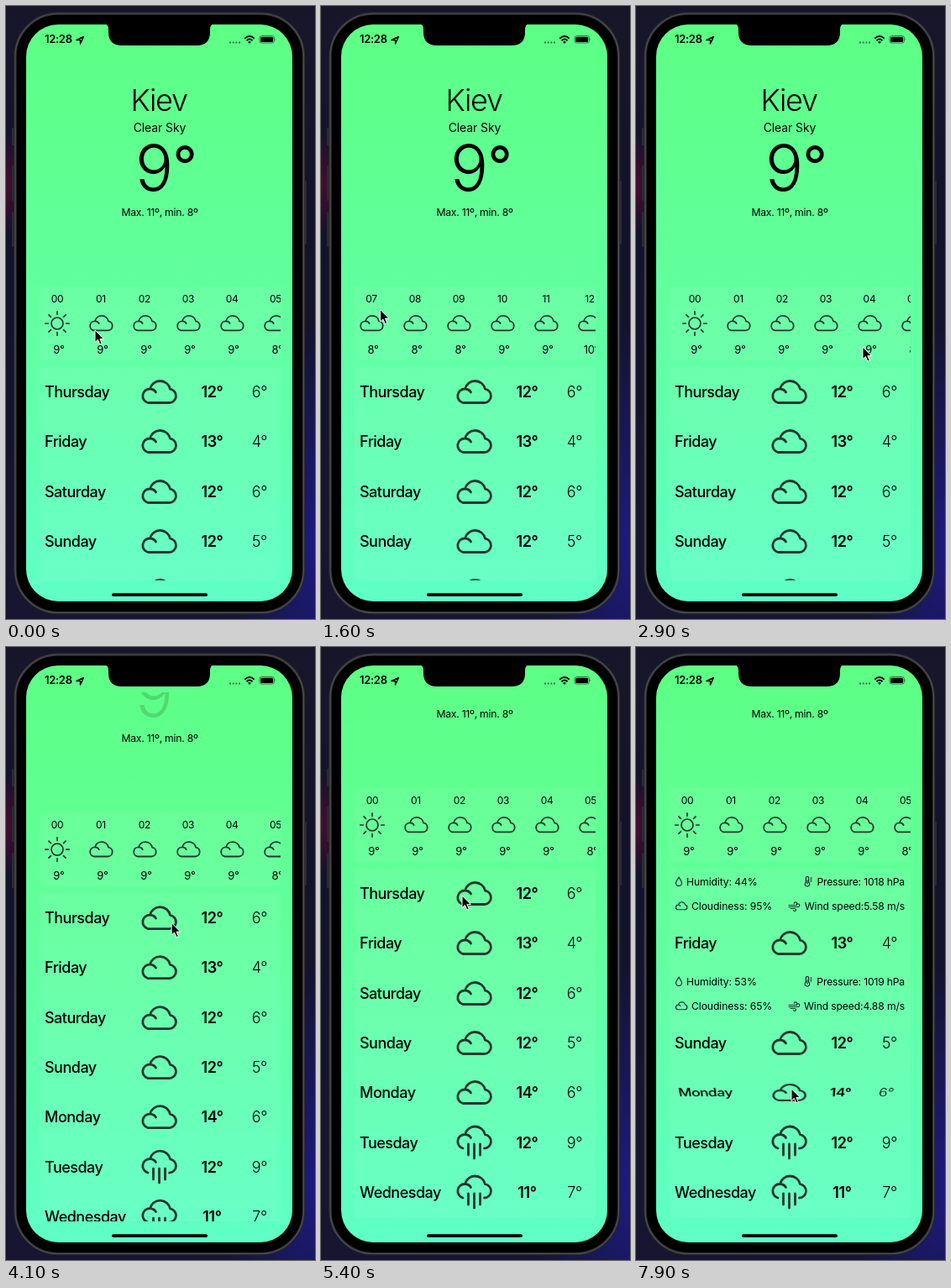
Write an HTML page that moves like this. It is 368x730 px and loops after 8000 ms.

```html
<!DOCTYPE html>
<html lang="en">
<head>
<meta charset="utf-8">
<title>Weather</title>
<style>
  html, body { margin: 0; width: 100%; height: 100%; overflow: hidden; background: #15142a; }
  svg, #view { position: absolute; left: 0; top: 0; }
  svg { font-family: Inter, Roboto, sans-serif; overflow: visible; }
  #view { width: 368px; height: 730px; clip-path: inset(54px 0 46px 0); }
  #page { position: absolute; inset: 0; }
  #page .face { left: 40px; }
  .line { fill: none; stroke: #26362f; stroke-linecap: round; stroke-linejoin: round; }
</style>
</head>
<body>
<svg width="368" height="730">
  <defs>
    <linearGradient id="sky" x2="0" y2="1">
      <stop stop-color="#5dff84"/><stop offset=".5" stop-color="#62ffa0"/><stop offset="1" stop-color="#5fffc6"/>
    </linearGradient>
    <linearGradient id="wall" x2="0" y2="1">
      <stop stop-color="#171629"/><stop offset=".35" stop-color="#13122c"/><stop offset="1" stop-color="#17152f"/>
    </linearGradient>
    <radialGradient id="red"><stop stop-color="#4a0d2c"/><stop offset="1" stop-color="#4a0d2c" stop-opacity="0"/></radialGradient>
    <radialGradient id="blue"><stop stop-color="#1c1a80"/><stop offset="1" stop-color="#1c1a80" stop-opacity="0"/></radialGradient>
    <clipPath id="strip"><rect x="40" y="334" width="287" height="88"/></clipPath>
  </defs>
  <rect width="368" height="730" fill="url(#wall)"/>
  <ellipse cx="0" cy="212" rx="24" ry="60" fill="url(#red)"/>
  <ellipse cx="368" cy="640" rx="110" ry="260" fill="url(#blue)"/>
  <g fill="#2b2b33">
    <rect x="7" y="145" width="4" height="21" rx="1"/><rect x="7" y="190" width="4" height="42" rx="1"/>
    <rect x="7" y="245" width="4" height="42" rx="1"/><rect x="354" y="208" width="4" height="76" rx="1"/>
  </g>
  <rect x="11" y="9" width="343.5" height="713.5" rx="51" fill="#000" stroke="#29292d" stroke-width="3.5"/>
  <rect x="11" y="9" width="343.5" height="713.5" rx="51" fill="none" stroke="#505056" stroke-width="1.2"/>
  <rect x="24" y="22" width="317" height="687" rx="38" fill="url(#sky)"/>
</svg>
<div id="view"><div id="page"></div></div>
<svg width="368" height="730" id="top"></svg>
<script>
const $ = id => document.getElementById(id);
const text = (x, y, s, size, weight = 400, gap = 0, anchor = 'middle') =>
  `<text x="${x}" y="${y}" font-size="${size}" font-weight="${weight}" letter-spacing="${gap}" text-anchor="${anchor}">${s}</text>`;
const icon = (x, y, d, scale = 1, width = 2.8) =>
  `<path class="line" transform="translate(${x} ${y}) scale(${scale})" stroke-width="${width}" d="${d}"/>`;

const lobes = 'M12.5 12.5A8.2 8.2 0 0 0 13.5-3.8A12.3 12.3 0 0 0-10.5-4A8.4 8.4 0 0 0-13 12.5M-10.5-4q5 .2 7 4';
const cloud = lobes + 'M-13 12.5H12.5';
const drop = 'M0-5C-1.5-2-3.5 0-3.5 2A3.5 3.5 0 0 0 3.5 2C3.5 0 1.5-2 0-5Z';
const thermo = 'M-1.6 1V-4a1.6 1.6 0 0 1 3.2 0V1a2.8 2.8 0 1 1-3.2 0M0-1V3M4-4h1M4-2h1M4 0h1';
const wind = 'M-6-1H2a1.8 1.8 0 1 0-1.8-2M-6 1H5a1.8 1.8 0 1 0-1.8-2M-4 3H1a1.5 1.5 0 1 1-1.4 2';
let sun = 'M7 0A7 7 0 1 1-7 0A7 7 0 1 1 7 0';
for (let i = 0; i < 8; i++) {
  const c = Math.cos(i * Math.PI / 4), s = Math.sin(i * Math.PI / 4);
  sun += `M${10.7 * c} ${10.7 * s}L${14.2 * c} ${14.2 * s}`;
}
const rain = (x, y) => icon(x, y - 6.5, lobes) + icon(x, y, 'M-6.5 1V14M.5 1V18M7.5 1V14');

const temps = [9, 9, 9, 9, 9, 8, 8, 8, 8, 8, 9, 9, 10, 10, 10, 11];
const hours = temps.map((deg, i) => {
  const x = 61 + 52 * i;
  return text(x, 352.5, String(i).padStart(2, '0'), 12, 400, -.3) +
    (i ? icon(x, 378, cloud, .67, 2.7) : icon(x, 378, sun, 1, 1.7)) +
    text(x + 2, 414, deg + '°', 13, 400, -.3);
}).join('');

const days = [
  ['Thursday', 12, 6, 44, 1018, 95, '5.58'], ['Friday', 13, 4, 50, 1018, 80, '5.10'],
  ['Saturday', 12, 6, 53, 1019, 65, '4.88'], ['Sunday', 12, 5, 55, 1019, 70, '4.20'],
  ['Monday', 14, 6, 52, 1017, 75, '4.35'], ['Tuesday', 12, 9, 70, 1012, 98, '5.02'],
  ['Wednesday', 11, 7, 72, 1011, 99, '5.31']];
const pitch = 59.35;
const face = (i, body) =>
  `<svg class="face" style="top:${430 + pitch * i}px" width="287" height="${pitch}" viewBox="40 0 287 ${pitch}">${body}</svg>`;
const front = ([name, max, min], i) => face(i,
  text(46, 36.3, name, 18, 500, -.5, 'start') +
  (i < 5 ? icon(182, 30, cloud) : rain(182, 30)) +
  text(245.5, 36.3, max + '°', 18, 600, -.4) + text(302, 36.3, min + '°', 18, 300, -.3));
const back = ([, , , humidity, pressure, clouds, speed], i) => face(i,
  icon(51, 15, drop, 1, 1.25) + text(60, 19.7, `Humidity: ${humidity}%`, 12.2, 400, -.1, 'start') +
  icon(204, 15, thermo, 1, 1.25) + text(320, 19.7, `Pressure: ${pressure} hPa`, 12.2, 400, -.2, 'end') +
  icon(54, 44.5, cloud, .34, 3.6) + text(66, 49, `Cloudiness: ${clouds}%`, 12.2, 400, -.1, 'start') +
  icon(188, 44.5, wind, 1, 1.15) + text(320, 49, `Wind speed:${speed} m/s`, 12.2, 400, -.15, 'end'));

$('page').innerHTML = `<svg width="368" height="900">
  <g id="title">
  ${text(182, 125, 'Kiev', 36, 300, -1.3)}
  ${text(183, 150, 'Clear Sky', 14, 400, -.1)}
  ${text(154, 219.5, '9', 75, 300, 0, 'start')}
  ${text(198.5, 213, '°', 64, 400, 0, 'start')}
  </g>
  ${text(183, 249.5, 'Max. 11º, min. 8º', 12.2, 400, -.25)}
  <g fill="#fff" fill-opacity=".06"><rect x="40" y="334" width="287" height="88" rx="4"/>
  <rect x="40" y="430" width="287" height="416" rx="4"/></g>
  <g clip-path="url(#strip)"><g id="hours">${hours}</g></g></svg>` +
  days.map((d, i) => front(d, i) + back(d, i)).join('');

$('top').innerHTML = `
  <path d="M116 21Q122 21 122 28V31Q122 47 138 47H227Q243 47 243 31V28Q243 21 249 21Z"/>
  ${text(46, 44.3, '12:28', 13, 600, -.3, 'start')}
  <path d="M84 40.5L92.5 36.5L88.5 45V40.5Z" fill="none" stroke="#000" stroke-width="1.4" stroke-linejoin="round"/>
  <path d="M266 43.5H279" stroke="#2f7a4c" stroke-width="2" stroke-dasharray="2 1.7"/>
  <g fill="none" stroke="#000" stroke-width="1.9"><path d="M284.3 38.7Q290 33.2 295.7 38.7"/><path d="M286.5 41.2Q290 38 293.5 41.2"/></g>
  <path d="M288 42.7Q290 41.2 292 42.7L290 44.9Z"/>
  <rect x="302" y="35.5" width="17.5" height="8.6" rx="2.6" fill="none" stroke="#000" stroke-opacity=".5"/>
  <rect x="303.2" y="36.7" width="15" height="6.2" rx="1.5"/><path d="M320.6 38.3q1.5 1.5 0 3Z" fill-opacity=".6"/>
  <rect x="126" y="699.3" width="114" height="3.7" rx="1.8"/>
  <path id="cursor" d="M0 0V14.5L3.4 11.4L5.8 17L8.3 16L5.9 10.6H10.4Z" stroke="#fff" stroke-width="1"/>`;

const smooth = u => (u = Math.min(1, Math.max(0, u)), u * u * (3 - 2 * u));
// keys: [time, ...values], eased between neighbours
function track(keys, t) {
  const i = keys.findIndex(k => k[0] > t);
  if (i < 1) return keys[i ? keys.length - 1 : 0].slice(1);
  const a = keys[i - 1], b = keys[i], u = smooth((t - a[0]) / (b[0] - a[0]));
  return a.slice(1).map((v, j) => v + (b[j + 1] - v) * u);
}
const swipe = [[0, 0], [500, 0], [1550, 365], [1750, 365], [2800, -9], [2900, -9], [3250, 0]];
const scroll = [[0, 0], [3400, 0], [4450, 184.5], [4600, 184.5], [5100, 166]];
const pointer = [[0, 106, 386], [450, 255, 380], [1150, 70.5, 361.5], [1600, 70.5, 361.5], [1800, 75, 380],
  [2800, 270, 406], [2950, 270, 406], [3400, 205, 500], [4300, 196, 304], [4600, 196, 304],
  [5300, 168, 296], [6050, 168, 296], [6500, 177, 420], [7050, 177, 420], [7600, 185, 526]];
const flips = { 0: 5650, 2: 6600, 4: 7745 };
const faces = document.querySelectorAll('.face');

function draw(now) {
  const t = now % 8000, [offset] = track(scroll, t);
  $('hours').setAttribute('transform', `translate(${-track(swipe, t)[0]} 0)`);
  $('page').style.transform = `translateY(${-offset}px)`;
  $('title').style.opacity = Math.max(0, 1 - offset / 160);
  $('cursor').setAttribute('transform', `translate(${track(pointer, t).join(' ')})`);
  days.forEach((_, i) => {
    const turn = 180 * smooth((t - (flips[i] ?? 9000)) / 500);
    const push = -30 * Math.sin(turn * Math.PI / 180);
    [-turn, 180 - turn].forEach((angle, side) => {
      const el = faces[2 * i + side];
      el.style.visibility = (turn > 90) == side ? 'visible' : 'hidden';
      el.style.transform = turn % 180 ? `perspective(590px) translateZ(${push}px) rotateX(${angle}deg)` : 'none';
    });
  });
  requestAnimationFrame(draw);
}
draw(performance.now());
</script>
</body>
</html>
```
